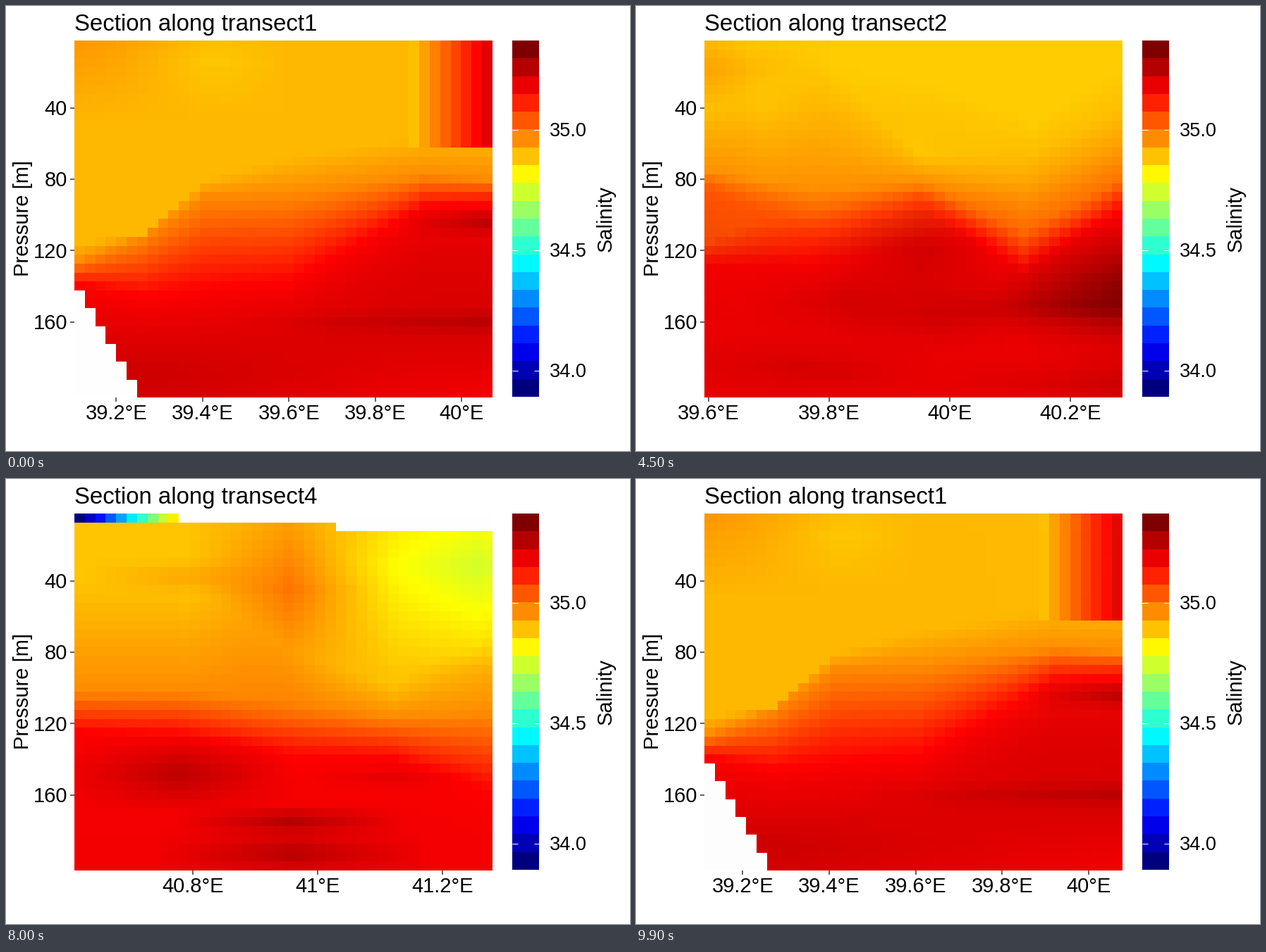
Recreate the animation shown at these times as a matplotlib script. Size 885 px wide and 632 px high, loop 10000 ms.

```python
import numpy as np
import matplotlib.pyplot as plt
from matplotlib.animation import FuncAnimation

W, H, DPI = 885, 632, 100
LEFT, RIGHT, TOP, BOTTOM = 97, 690, 49, 556
N = 40                                  # cells per side, 5 m per row
PERIOD, HOLD, MOVE = 25, 16, 9          # frames per transect
DEPTH = 5.0 * np.arange(1, N + 1)
COL = np.arange(N)

plt.rcParams["font.family"] = "Liberation Sans"

# ---- colour ----
M = np.array([[0.4124, 0.3576, 0.1805],
              [0.2126, 0.7152, 0.0722],
              [0.0193, 0.1192, 0.9505]])
WHITE_XYZ = M.sum(axis=1)


def jet(level):
    """RGB for a level from 0 (dark blue) to 8 (dark red)."""
    def hill(centre):
        return np.clip(2 - np.abs(level - centre) / 2, 0, 1) if False else \
            np.clip((3 - np.abs(level - centre)) / 2, 0, 1)
    return np.stack([hill(6), hill(4), hill(2)], axis=-1)


def to_lab(rgb):
    lin = np.where(rgb > 0.04045, ((rgb + 0.055) / 1.055) ** 2.4, rgb / 12.92)
    xyz = lin @ M.T / WHITE_XYZ
    f = np.where(xyz > 0.008856, np.cbrt(xyz), 7.787 * xyz + 16 / 116)
    x, y, z = np.moveaxis(f, -1, 0)
    return np.stack([116 * y - 16, 500 * (x - y), 200 * (y - z)], axis=-1)


def to_srgb(lab):
    l, a, b = np.moveaxis(lab, -1, 0)
    y = (l + 16) / 116
    f = np.stack([y + a / 500, y, y - b / 200], axis=-1)
    xyz = np.where(f > 0.2069, f ** 3, (f - 16 / 116) / 7.787) * WHITE_XYZ
    lin = np.clip(xyz @ np.linalg.inv(M).T, 0, 1)
    return np.where(lin > 0.0031308, 1.055 * lin ** (1 / 2.4) - 0.055, 12.92 * lin)


# ---- sections: a front between fresh surface and salty deep water ----
def tent(values, centre, reach):
    return np.clip(1 - np.abs(values - centre) / reach, 0, 1)


def section(surface, gain, stations, start, mid, red, patches):
    """Front depths at the stations, plus (col, depth, reach x, reach z, amount)."""
    top, half, low = (np.interp(COL, stations, z) for z in (start, mid, red))
    u = np.array([np.interp(DEPTH, zs, (surface, 5.9, 7))
                  for zs in zip(top, half, low)]).T
    below = np.clip(DEPTH[:, None] - low, 0, None)
    u += gain * (1 - np.exp(-below / 20))
    for col, depth, rx, rz, amount in patches:
        u += amount * np.outer(tent(DEPTH, depth, rz), tent(COL, col, rx))
    return u


S1 = section(5.55, 0.3, (0, 6, 12, 20, 33, 39),
             start=(116, 110, 81, 68, 56, 56),
             mid=(126, 112.5, 89, 88, 78, 80),
             red=(139.5, 146, 142, 138, 96, 94),
             patches=[(0, 5, 14, 45, 0.25), (12, 15, 8, 30, -0.13),
                      (39, 104, 9, 9, 0.42), (39, 160, 26, 9, 0.25),
                      (6, 188, 24, 25, 0.12), (39, 200, 30, 30, -0.2)])
S1[DEPTH <= 60, 32:] = 5.5 + 0.245 * np.arange(8)

S2 = section(5.42, 0.17, (0, 10.5, 20.3, 30, 39),
             start=(42, 12, 68, 68, 42),
             mid=(76, 86, 82, 110, 81),
             red=(89, 115, 96, 134, 99),
             patches=[(0, 18, 12, 22, 0.36), (20.3, 65, 10, 20, -0.12),
                      (20.3, 118, 11, 32, 0.45), (39, 143, 11, 42, 0.8),
                      (36, 152, 16, 9, 0.4), (8, 185, 14, 18, 0.2),
                      (39, 195, 8, 20, 0.3)])

S3 = section(5.35, 0.2, (0, 5, 12.5, 22, 31, 39),
             start=(-60, 40, 15, 28, 48, 20),
             mid=(114, 104, 96, 79, 80, 62),
             red=(129, 130, 128, 117, 113, 97),
             patches=[(13, 148, 10, 22, 0.5), (22, 157, 11, 20, 0.5),
                      (31, 146, 12, 22, 0.4), (39, 138, 12, 35, 0.6),
                      (36, 173, 16, 12, -0.15), (31, 193, 10, 10, 0.25),
                      (12, 190, 6, 8, 0.18)])

S4 = section(5.45, 0.1, (0, 9.5, 20.3, 30, 39),
             start=(40, 40, 80, 98, 72),
             mid=(102, 102, 108, 116, 114),
             red=(125, 127, 139, 140, 158),
             patches=[(20.3, 45, 10, 70, 0.65), (38, 32, 18, 60, -0.8),
                      (9.5, 38, 9, 10, 0.25), (9.5, 148, 11, 22, 0.48),
                      (30, 150, 9, 8, 0.15), (20.3, 175, 11, 10, 0.5),
                      (20.3, 193, 13, 14, 0.5)])
S4[0] = 0.57 * COL

# Cells without data: sloping sea floor, missing surface samples
for c in range(6):
    S1[DEPTH > min(140 + 10 * c, 195), c] = np.nan
S4[0, 10:] = np.nan
S4[1, 25:] = np.nan


def cell_colours(levels):
    rgb = jet(levels)
    rgb[np.isnan(levels)] = 1
    return to_lab(rgb)


CELLS = [cell_colours(s) for s in (S1, S2, S3, S4)]
SPANS = np.array([(39.103, 0.9685), (39.5917, 0.6653),
                  (39.597, 0.743), (40.610, 0.670)])   # west edge, width

# ---- stage ----
fig = plt.figure(figsize=(W / DPI, H / DPI), dpi=DPI, facecolor="white")
ax = fig.add_axes([0, 0, 1, 1])
ax.axis("off")


def raster(rgb, x0, x1, y0, y1):
    return ax.imshow(rgb, extent=(x0, x1, y1, y0), aspect="auto",
                     interpolation="nearest")


def label(x, y, text, ha="center", size=21, **kw):
    return ax.text(x, y, text, ha=ha, va="baseline", fontsize=size,
                   color="black", **kw)


def line(xs, ys, color="#333333", width=1.5):
    return ax.plot(xs, ys, color=color, lw=width * 72 / DPI,
                   solid_capstyle="butt")[0]


panel = raster(to_srgb(CELLS[0]), LEFT, RIGHT, TOP, BOTTOM)
raster(jet(np.linspace(8, 0, 20))[:, None], 718, 756, TOP, 555)
ax.set_xlim(0, W)
ax.set_ylim(H, 0)

title = label(LEFT, 35.5, "", ha="left", size=23.8)
label(32.5, 302, "Pressure [m]", rotation=90, rotation_mode="anchor")
label(859, 302, "Salinity", rotation=90, rotation_mode="anchor")

for p in (40, 80, 120, 160):
    y = 144.5 + (p - 40) * 2.534
    label(87, y + 10.4, str(p), ha="right")
    line([91, LEFT], [y, y])

for s in (34.0, 34.5, 35.0):
    y = 517.5 - (s - 34) * 342
    label(771, y + 9.8, f"{s:.1f}", ha="left", size=19.5)
    for x in (718, 748.5):
        line([x, x + 7.5], [y, y], "white", 1)

ticks = [(line([0, 0], [BOTTOM, BOTTOM + 6]), label(0, 587, "")) for _ in range(5)]


def ease(t):
    return 4 * t ** 3 if t < 0.5 else 1 - 4 * (1 - t) ** 3


def draw_ticks(west, width):
    first, last = int(np.ceil(west * 5)), int(np.floor((west + width) * 5))
    for i, (mark, text) in enumerate(ticks):
        lon = (first + i) / 5
        shown = first + i <= last
        mark.set_visible(shown)
        text.set_visible(shown)
        x = LEFT + (lon - west) / width * (RIGHT - LEFT)
        mark.set_xdata([x, x])
        text.set_x(x)
        text.set_text(f"{lon:g}°E")


def update(frame):
    state, step = divmod(frame, PERIOD)
    following = (state + 1) % 4
    t = max(0, step - HOLD) / MOVE
    k = ease(t)
    panel.set_data(to_srgb((1 - k) * CELLS[state] + k * CELLS[following]))
    draw_ticks(*((1 - k) * SPANS[state] + k * SPANS[following]))
    nearest = following if t > 0.6 else state
    title.set_text(f"Section along transect{nearest + 1}")
    return []


anim = FuncAnimation(fig, update, frames=4 * PERIOD, interval=100,
                     repeat=True, repeat_delay=0, blit=False)
plt.show()
```
